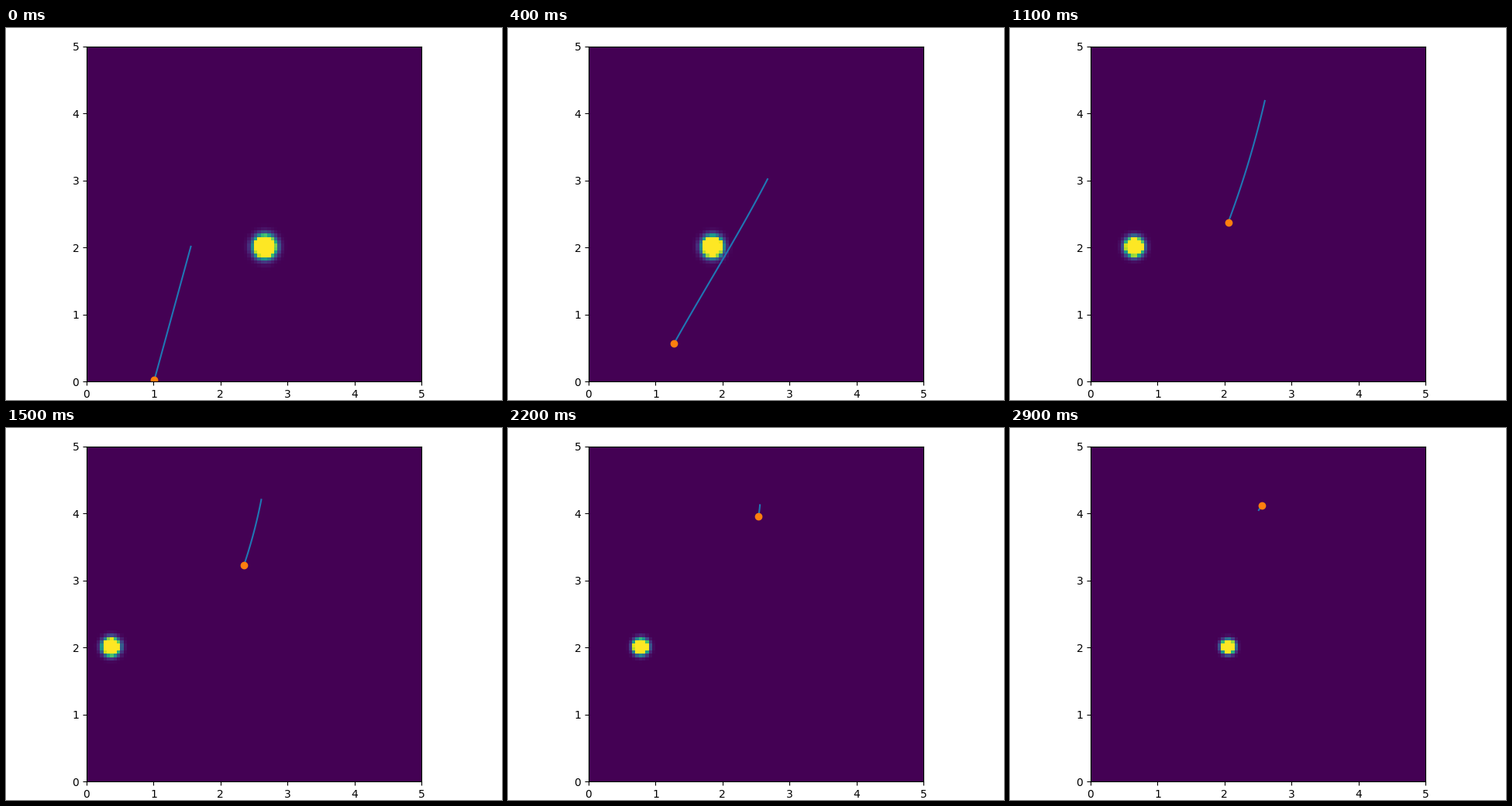
A matplotlib script for the animation above (3 s loop, 640 px wide and 480 px high).

```python
import numpy as np
import matplotlib.pyplot as plt
from matplotlib.animation import FuncAnimation

FRAMES = 30
SIZE = 5.0
CELLS = 100
START = np.array([1.0, 0.0])
GOAL = np.array([2.56, 4.14])
PACE = np.array([11.3, 13.0])   # steps the robot needs along x and y
SWAY = np.array([0.05, 0.08])   # slow drift of the plan's end about the goal


def obstacle(t):
    """Centre and radius of the obstacle, which swings and slowly shrinks."""
    centre = 2.073 - 1.72 * np.cos(0.12 * (t - 16)), 2.006
    return centre, 0.1525 * np.exp(-0.017 * t)


def robot_at(t):
    """Ease from start to goal; the first frame is already one step in."""
    return GOAL - (GOAL - START) * np.exp(-((t + 1) / PACE) ** 2)


def horizon_at(t):
    """End of the plan: flips to the obstacle's right, then climbs to the goal."""
    swing = 0.956 * (2.15 * t - 1) * np.exp(-t)
    drop = -2.04 * np.exp(-(t / 4.9) ** 2.2)
    return GOAL + [swing, drop - 0.01] + SWAY * np.cos(0.2 * (t - 14))


def plan(t, n=40):
    """Cubic Bezier from the robot to the horizon, bent around the obstacle."""
    a, d = robot_at(t), horizon_at(t)
    chord = d - a
    left = np.array([-chord[1], chord[0]])
    lean = -0.022 * (1 - np.exp(-t))
    dodge = t * np.exp(-t)
    b = a + chord / 3 + left * (lean + 0.33 * dodge)
    c = a + chord * 2 / 3 + left * (lean + 0.11 * dodge)
    s = np.linspace(0, 1, n)[:, None]
    return ((1 - s) ** 3 * a + 3 * s * (1 - s) ** 2 * b
            + 3 * s ** 2 * (1 - s) * c + s ** 3 * d)


cells = (np.arange(CELLS) + 0.5) * SIZE / CELLS
grid_x, grid_y = np.meshgrid(cells, cells)


def cost(t):
    """Gaussian bump, clipped to 1 inside the radius."""
    (x, y), radius = obstacle(t)
    dist2 = (grid_x - x) ** 2 + (grid_y - y) ** 2
    return np.minimum(np.exp(1.4 * (1 - dist2 / radius ** 2)), 1)


fig = plt.figure(figsize=(6.4, 4.8), dpi=100)
ax = fig.add_axes([0.1625, 0.05, 0.675, 0.9])
field = ax.imshow(cost(0), origin="lower", extent=(0, SIZE, 0, SIZE),
                  cmap="viridis", vmin=0, vmax=1, interpolation="nearest")
path, = ax.plot([], [], color="C0")
robot, = ax.plot([], [], "o", color="C1")
ax.set(xlim=(0, SIZE), ylim=(0, SIZE), xticks=range(6), yticks=range(6))


def update(t):
    x, y = robot_at(t)
    field.set_data(cost(t))
    path.set_data(*plan(t).T)
    robot.set_data([x], [y])
    return field, path, robot


anim = FuncAnimation(fig, update, frames=FRAMES, interval=100,
                     repeat=True, repeat_delay=0)
plt.show()
```
